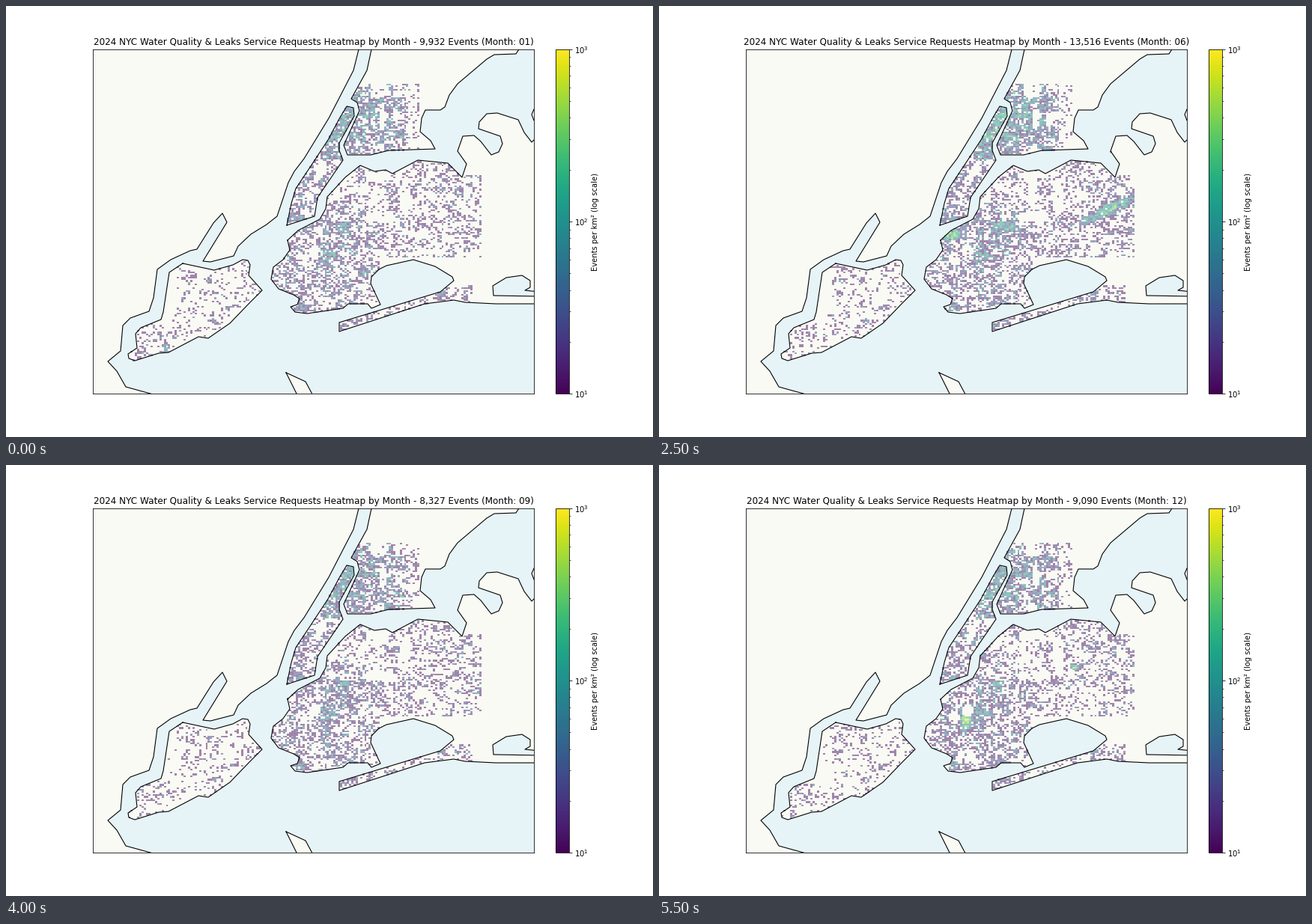
Recreate the animation shown at these times as a matplotlib script. Size 864x576 px, loop 6000 ms.

```python
import numpy as np
import matplotlib.pyplot as plt
from matplotlib.animation import FuncAnimation
from matplotlib.colors import LogNorm
from matplotlib.path import Path

W, H, DPI = 864, 576, 72
LEFT, RIGHT, TOP, BOTTOM = 116.4, 705.2, 57.6, 518.4
BINS = 200
PER_EVENT = 12.4  # events per km² for one event in a cell
LAND, WATER = "#fafaf4", "#e6f3f7"

EVENTS = [9932, 8415, 8160, 7530, 7405, 13516,
          12874, 11486, 8327, 7628, 8052, 9090]

# Key points of each coastline, in stage pixels
WEST = [(471, 50), (471, 58), (464, 86), (431, 150), (398, 204), (385, 221),
        (377, 236), (362, 281), (348, 292), (327, 305), (310, 321), (304, 334),
        (273, 342), (263, 341), (295, 289), (289, 277), (277, 290), (255, 325),
        (246, 327), (220, 339), (202, 352), (197, 390), (191, 408), (166, 417),
        (156, 427), (153, 461), (136, 475), (148, 488), (160, 509), (200, 520),
        (200, 530), (90, 530), (90, 50)]
STATEN = [(236, 344), (278, 353), (303, 346), (316, 339), (323, 340), (326, 346),
          (324, 360), (342, 380), (324, 398), (299, 424), (270, 444), (257, 442),
          (217, 463), (204, 464), (172, 474), (164, 471), (163, 465), (175, 457),
          (173, 438), (180, 430), (207, 419), (210, 409), (218, 356)]
MANHATTAN = [(375, 293), (381, 264), (387, 244), (405, 217), (430, 179),
             (446, 149), (455, 134), (464, 136), (465, 147), (445, 183),
             (445, 193), (450, 206), (416, 256), (412, 281)]
NORTH = [(488, 50), (488, 58), (482, 86), (461, 124), (469, 129), (472, 140),
         (451, 186), (456, 199), (487, 199), (511, 193), (573, 191), (567, 180),
         (553, 168), (555, 150), (560, 139), (580, 139), (586, 135), (592, 119),
         (603, 104), (642, 71), (652, 65), (681, 64), (690, 50)]
SOUND = [(376, 313), (390, 300), (419, 285), (427, 271), (429, 255), (453, 229),
         (473, 213), (492, 221), (507, 219), (516, 224), (550, 206), (590, 210),
         (609, 229), (615, 211), (603, 194), (610, 174), (625, 173), (634, 181),
         (648, 199), (658, 195), (663, 184), (660, 174), (631, 164), (632, 155),
         (642, 144), (656, 143), (684, 152), (692, 169), (702, 182), (712, 172)]
OCEAN = [(712, 398), (654, 398), (613, 396), (598, 393), (559, 398), (445, 435),
         (445, 423), (580, 382), (598, 367), (596, 362), (573, 348), (544, 339),
         (508, 347), (498, 352), (488, 362), (487, 371), (500, 399), (488, 404),
         (483, 398), (457, 398), (450, 404), (402, 411), (386, 409), (380, 402),
         (389, 399), (392, 391), (384, 386), (364, 378), (354, 365), (357, 349),
         (370, 339), (379, 326)]
HOOK = [(374, 490), (400, 502), (415, 530), (394, 530)]
COVE = [(712, 130), (705, 138), (702, 145), (705, 153), (712, 160)]
BAY = [(712, 382), (693, 380), (700, 376), (700, 367), (689, 360),
       (668, 363), (650, 374), (651, 387), (712, 388)]
ISLAND = SOUND + OCEAN

# Bumps: x, y, spread along, spread across, tilt in degrees, height
PARKS = [(420, 221, 18, 5, -60, 1), (503, 150, 5, 14, 0, 1), (498, 110, 12, 13, 0, 1),
         (533, 255, 7, 26, 0, 1), (498, 226, 14, 6, 0, 1), (498, 282, 22, 7, 0, 1),
         (412, 328, 7, 9, 0, 1), (394, 338, 7, 8, 0, 1), (214, 385, 18, 38, 0, 1)]
STEADY = [(455, 304, 24, 16, 0, 1.1), (431, 336, 7, 9, 0, 2.2)]
HYDRANTS = [(474, 158, 24, 13, -50, 3.2), (446, 170, 26, 8, -60, 1.8)]
FLARES = {
    1: [(478, 357, 3, 3, 0, 8), (214, 458, 3, 3, 0, 6)],
    6: [(600, 272, 17, 3.5, -27, 20), (392, 306, 6, 4, -20, 30), (466, 295, 8, 4, 20, 8)],
    8: [(452, 155, 12, 6, -60, 9), (397, 308, 8, 4, 0, 6)],
    10: [(629, 332, 6, 3, 0, 13), (407, 256, 4, 5, 0, 4)],
    12: [(410, 338, 3.5, 7, 0, 55), (555, 270, 3, 2, 0, 25), (431, 252, 3, 3, 0, 9)],
}

x_edges = np.linspace(LEFT, RIGHT, BINS + 1)
y_edges = np.linspace(TOP, BOTTOM, BINS + 1)
X, Y = np.meshgrid((x_edges[1:] + x_edges[:-1]) / 2, (y_edges[1:] + y_edges[:-1]) / 2)
CELLS = np.column_stack([X.ravel(), Y.ravel()])


def inside(outline):
    return Path(outline).contains_points(CELLS).reshape(X.shape)


def bump(x, y, along, across, tilt, height):
    a = np.radians(tilt)
    u = (X - x) * np.cos(a) + (Y - y) * np.sin(a)
    v = (Y - y) * np.cos(a) - (X - x) * np.sin(a)
    return height * np.exp(-((u / along) ** 2 + (v / across) ** 2) / 2)


def bumps(items):
    return sum((bump(*b) for b in items), np.zeros_like(X))


def borough_rate():
    """Mean events per cell before the bumps are added."""
    bronx = inside(NORTH) & (Y > 104) & (X < 552)
    island = inside(ISLAND)
    brooklyn = island & (X < 500) & (Y > 284)
    queens = island & (X < 636) & (Y < 336) & ~brooklyn & ((X < 605) | (Y > 226))
    beach = island & (X > 505) & (X < 624) & (Y > 373)
    rate = (1.2 * inside(MANHATTAN) + 1.2 * bronx * np.where(X < 535, 1, 0.25)
            + 0.85 * brooklyn * np.where(X < 478, 1, 0.6)
            + 0.45 * queens + 0.5 * beach + 0.27 * inside(STATEN))
    for park in PARKS:
        rate = rate * np.where(bump(*park) > 0.6, 0.05, 1)
    return rate


def patchiness():
    """Fixed unevenness: blocks of streets, then single cells."""
    rng = np.random.default_rng(7)
    blocks = np.kron(rng.gamma(2.5, 0.4, (50, 50)), np.ones((4, 4)))
    return blocks * rng.gamma(1.3, 1 / 1.3, X.shape)


RATE = borough_rate()
BUILT = RATE > 0.1
PATCHES = patchiness()


def density(month):
    rng = np.random.default_rng(100 + month)
    summer = 1.9 if month in (6, 7, 8) else 1
    rate = RATE + BUILT * (bumps(STEADY) + summer * bumps(HYDRANTS))
    flare = BUILT * bumps(FLARES.get(month, [])) * rng.gamma(2, 0.5, X.shape)
    counts = rng.poisson(rate * PATCHES * (0.7 + EVENTS[month - 1] / 40000) + flare)
    return np.ma.masked_equal(counts * PER_EVENT, 0)


def shape(ax, points, color):
    xy = np.array(points + points[:1])
    ax.fill(*xy.T, color=color, lw=0, zorder=0.5)
    ax.plot(*xy.T, color="black", lw=1.1, zorder=3)


fig = plt.figure(figsize=(W / DPI, H / DPI), dpi=DPI)
ax = fig.add_axes([LEFT / W, 0.1, (RIGHT - LEFT) / W, 0.8], facecolor=WATER)
for outline in (WEST, STATEN, MANHATTAN, NORTH, ISLAND, HOOK, COVE):
    shape(ax, outline, LAND)
shape(ax, BAY, WATER)
ax.set(xlim=(LEFT, RIGHT), ylim=(BOTTOM, TOP), xticks=[], yticks=[])

norm = LogNorm(10, 1000)
mesh = ax.pcolormesh(x_edges, y_edges, density(1), norm=norm, cmap="viridis",
                     alpha=0.5, zorder=2)
title = ax.set_title("", fontsize=12)

cax = fig.add_axes([734.4 / W, 0.1, 17.9 / W, 0.8])
fig.colorbar(plt.cm.ScalarMappable(norm, "viridis"), cax=cax,
             label="Events per km² (log scale)")


def update(i):
    month = i + 1
    mesh.set_array(density(month))
    title.set_text("2024 NYC Water Quality & Leaks Service Requests Heatmap by Month"
                   f" - {EVENTS[i]:,} Events (Month: {month:02d})")
    return mesh, title


anim = FuncAnimation(fig, update, frames=12, interval=500, repeat=True,
                     repeat_delay=0, blit=False)
plt.show()
```
